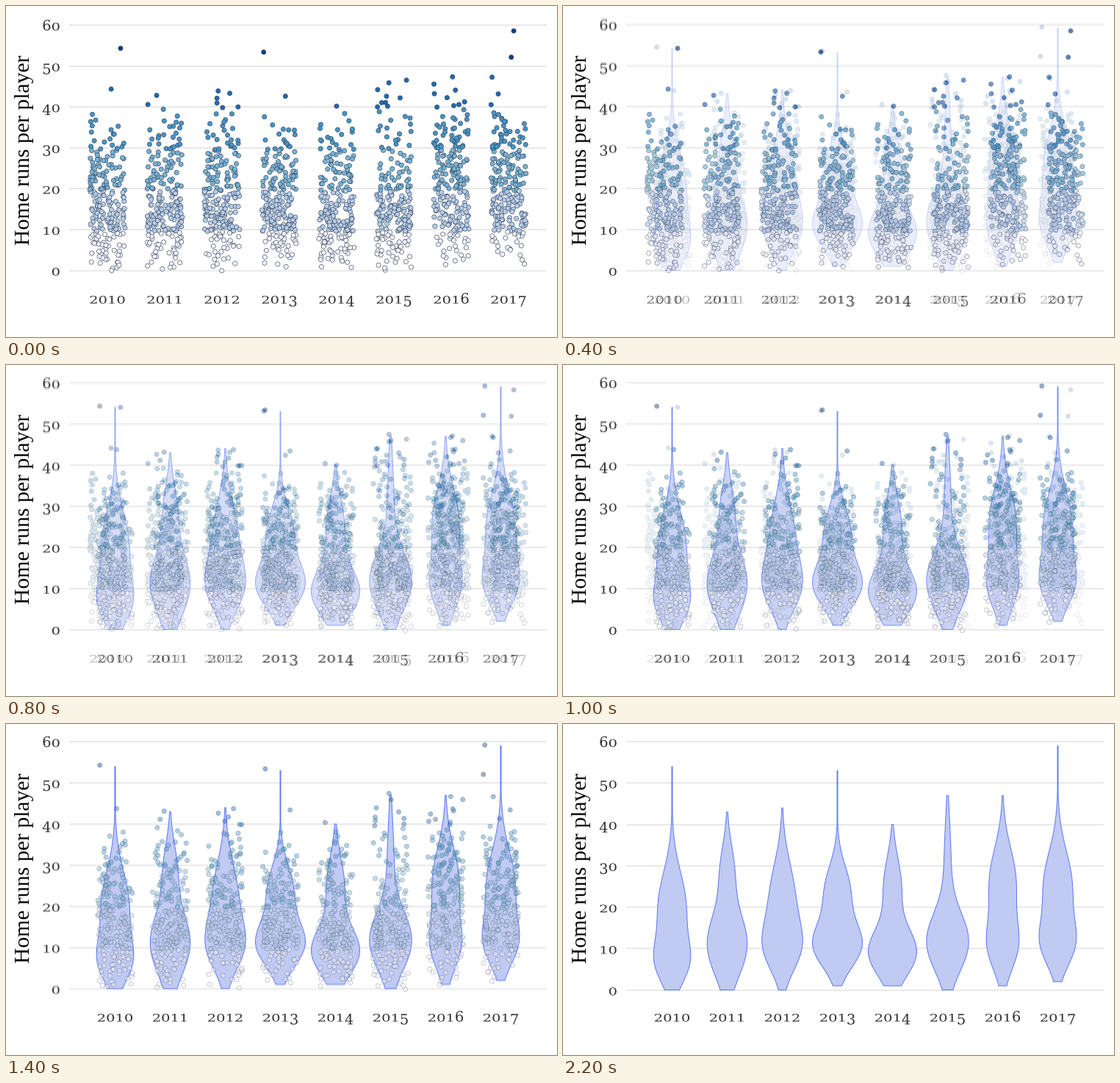
A matplotlib script for the animation above (2300 ms loop, 750x450 px).

```python
import numpy as np
import matplotlib.pyplot as plt
from matplotlib.animation import FuncAnimation
from matplotlib.patches import PathPatch
from matplotlib.textpath import TextPath
from matplotlib.transforms import Affine2D

W, H, DPI = 750, 450, 100
PX = 72 / DPI  # points per pixel
FRAMES, STEP_MS = 23, 100
PLAYERS = 205
BINS = ["#eff2fd", "#b4cdea", "#78b2d4", "#4695c6", "#2069b3", "#083f88"]
INK, GRID, FILL, EDGE = "#333333", "#e3e3e3", "#c0caf2", "#5b78f5"

# year: fewest and most runs, players with 40 or more,
# then two bell curves as (centre, sigma, half width in px)
YEARS = {
    2010: (0, 54, 2, (6.5, 5.3, 19), (20, 8.5, 19)),
    2011: (0, 43, 2, (11, 7.6, 27), (29, 6.5, 9)),
    2012: (0, 44, 6, (10, 5.8, 20), (22, 8.8, 17)),
    2013: (1, 53, 2, (10.8, 5.4, 32), (24, 6.2, 17)),
    2014: (1, 40, 1, (9, 5.7, 32), (25, 7, 12)),
    2015: (0, 47, 9, (11.5, 7, 28), (31, 10, 4.5)),
    2016: (1, 47, 9, (10.5, 6, 18.5), (26, 8.3, 18)),
    2017: (2, 59, 5, (11, 5.5, 19.5), (25, 8.5, 19.5)),
}


def half_width(year, v):
    bells = (a * np.exp(-((v - c) / s)**2 / 2) for c, s, a in YEARS[year][3:])
    return np.maximum(sum(bells), .45)


def home_runs(year):
    """Whole counts: the bulk follows the violin, the best thin out upwards."""
    lo, hi, n_top = YEARS[year][:3]
    v = np.linspace(lo, 39, 400)
    weight = half_width(year, v) * np.where(v < 9.5, .62, 1)
    cdf = np.cumsum(weight) / weight.sum()
    bulk = np.interp((np.arange(PLAYERS) + .5) / PLAYERS, cdf, v)
    best = 40 + (hi - 40) * (np.arange(1, n_top + 1) / n_top)**2
    return np.round(np.r_[bulk, best])


def numerals(ax, text, x, base, align, size=19.5):
    """Old-style figures: 0-2 at x-height, 3 4 5 7 9 hanging, 6 8 standing."""
    step = .636 * size
    x -= step * len(text) * (.5 if align == "center" else 1)
    for ch in text:
        glyph = TextPath((0, 0), ch, size=size, prop={"family": "DejaVu Serif"})
        tall = .73 if ch in "012" else 1
        drop = .2 * size if ch in "34579" else 0
        shape = Affine2D().scale(1, -tall).translate(x, base + drop)
        ax.add_patch(PathPatch(shape.transform_path(glyph), fc=INK, lw=0))
        x += step


def still(fig, zero, step, first, pitch, dots=True, violins=True, alpha=1, seed=0):
    """Draw one version of the chart and return it as an RGB array."""
    ax = fig.add_axes([0, 0, 1, 1], xlim=(0, W), ylim=(H, 0))
    ax.axis("off")
    rng = np.random.default_rng(seed)

    def level(v):
        return zero - v * step / 10

    for v in range(0, 61, 10):
        ax.plot([86, 736], [level(v)] * 2, color=GRID, lw=1.5 * PX,
                solid_capstyle="butt", zorder=0)
        numerals(ax, str(v), 74, level(v) + 7, "right")
    for i, year in enumerate(YEARS):
        cx = first + pitch * i
        numerals(ax, str(year), cx, 404.5, "center")
        if violins:
            v = np.linspace(*YEARS[year][:2], 150)
            w = half_width(year, v)
            ax.fill(np.r_[cx - w, (cx + w)[::-1]], level(np.r_[v, v[::-1]]),
                    fc=FILL, ec=EDGE, lw=PX, zorder=2)
        if dots:
            runs = rng.permutation(home_runs(year))
            x = cx + rng.uniform(-24, 24, runs.size)
            y = level(runs + rng.uniform(-.45, .45, runs.size))
            colors = [BINS[min(int(r // 10), 5)] for r in runs]
            ax.scatter(x, y, s=(6.2 * PX)**2, c=colors, alpha=alpha,
                       edgecolors="#2a3346", linewidths=.55 * PX, zorder=3)
    ax.text(32, 196, "Home runs per player", family="Liberation Serif",
            size=29.7 * PX, color="black", rotation=90, rotation_mode="anchor",
            ha="center", va="baseline")
    fig.canvas.draw()
    image = np.array(fig.canvas.buffer_rgba())[..., :3].astype(float)
    ax.remove()
    return image


fig = plt.figure(figsize=(W / DPI, H / DPI), dpi=DPI, facecolor="white")
jitter = still(fig, 359.5, 55.55, 138, 78, violins=False, seed=1)
both = still(fig, 359.5, 55.9, 148.5, 75, alpha=.52, seed=2)
shapes = still(fig, 361.6, 56.25, 148.5, 75, dots=False)
view = fig.figimage(jitter.astype(np.uint8))


def update(k):
    """Crossfade the stills: 12 steps, then 10, then a hard cut back."""
    if k <= 12:
        a, b, t = jitter, both, k / 12
    else:
        a, b, t = both, shapes, (k - 12) / 10
    view.set_data(np.round(a + (b - a) * t).astype(np.uint8))
    return [view]


anim = FuncAnimation(fig, update, frames=FRAMES, interval=STEP_MS,
                     repeat=True, repeat_delay=0)
plt.show()
```
